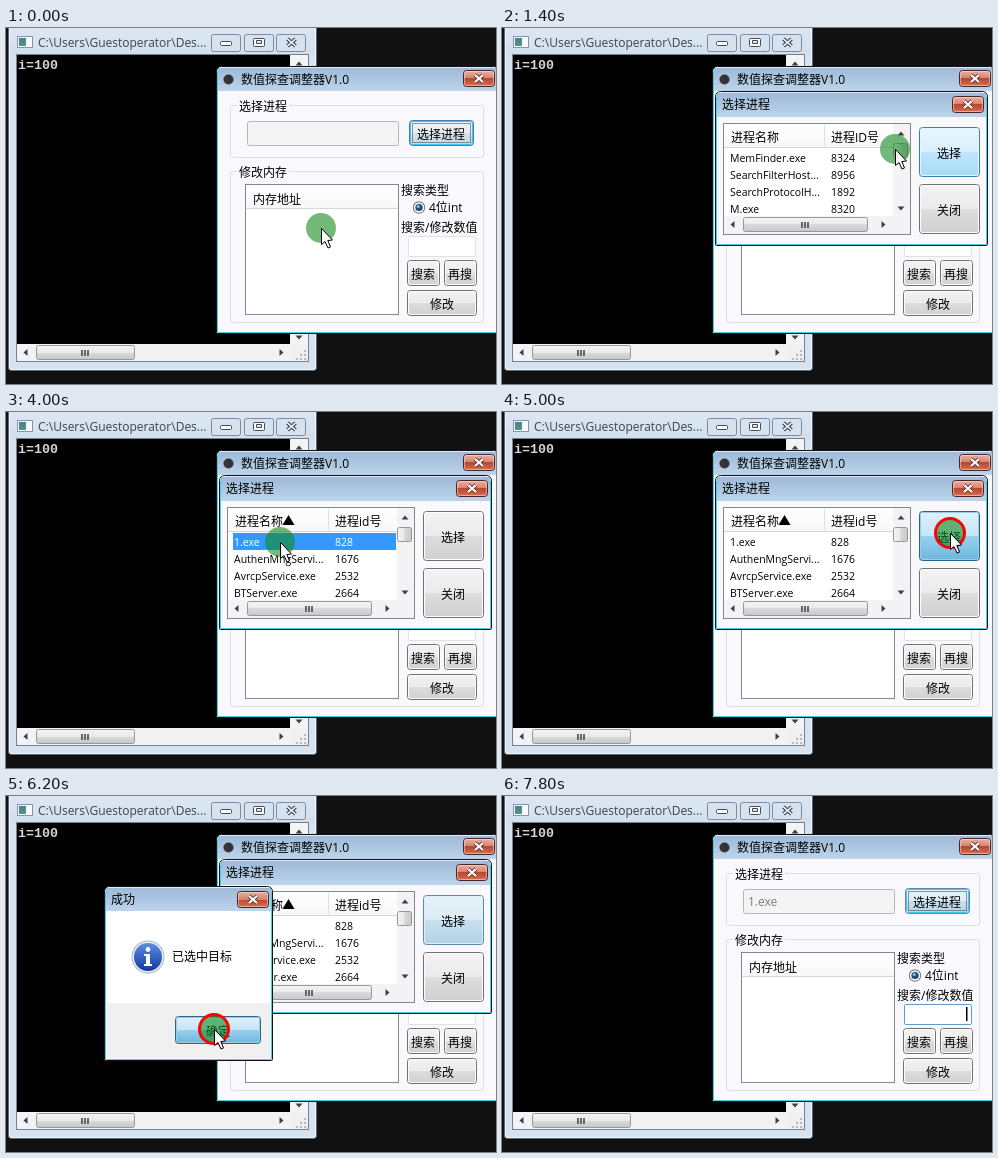
Recreate the animation shown at these times as an HTML page with a canvas. Size 490 by 356 pixels, loop 8000 ms.

```html
<!DOCTYPE html>
<html lang="zh">
<head>
<meta charset="utf-8">
<title>数值探查调整器</title>
<style>
html, body { margin: 0; width: 100%; height: 100%; overflow: hidden; background: #111; }
canvas { display: block; }
</style>
</head>
<body>
<canvas id="stage" width="490" height="356"></canvas>
<script>
const ctx = document.getElementById('stage').getContext('2d');
const UI = '12px "Open Sans", "Noto Sans CJK SC", "Noto Sans CJK", sans-serif';
const SMALL = '10.5px "Open Sans", "Noto Sans CJK SC", sans-serif';
const MONO = 'bold 13.33px "Liberation Mono", monospace';
const LOOP = 8000, CLIENT = '#f9f8fc', TRACK = '#f3f3f5';

// Pointer: time, x, y, pressed
const STEPS = [
  [0, 315, 200], [200, 250, 235], [400, 120, 285], [600, 34, 304], [800, 160, 260],
  [1000, 350, 150], [1200, 435, 106, 1],
  [1400, 393, 121], [1600, 345, 115], [1800, 318, 111], [2000, 308, 110], [2200, 305, 109],
  [2400, 304, 109], [2800, 304, 109, 1], [3200, 304, 109], [3400, 298, 112], [3600, 286, 120],
  [3800, 275, 129, 1], [4000, 274, 130], [4200, 300, 129], [4400, 360, 126], [4600, 410, 123],
  [4800, 444, 121], [5000, 448, 121, 1], [5200, 448, 121], [5400, 440, 127], [5600, 360, 165],
  [5800, 260, 212], [6000, 210, 232], [6200, 208, 233, 1],
  [6400, 208, 233], [6600, 270, 228], [6800, 390, 220], [7000, 452, 215], [7400, 454, 215, 1],
  [7600, 454, 215]
];
const POINTER_HIDDEN = 7800;

const BY_ID = [['MemFinder.exe', 8324], ['SearchFilterHost...', 8956], ['SearchProtocolH...', 1892], ['M.exe', 8320]];
const BY_NAME = [['1.exe', 828], ['AuthenMngServi...', 1676], ['AvrcpService.exe', 2532], ['BTServer.exe', 2664]];

const BUTTON = {
  normal: ['#707070', '#fcfcfc', '#f3f3f3', '#ebebeb', '#dddddd', '#cfcfcf'],
  focus: ['#3c7fb1', '#3ec8f0', '#f0f4f6', '#e6eef2', '#d6e3ea', '#c5d8e2'],
  tinted: ['#5d8aa8', '#d8f0fa', '#e8f2f8', '#dcebf4', '#c8e0ee', '#b2d2e4'],
  hot: ['#3c7fb1', '#e4f6fe', '#eaf6fd', '#d9f0fc', '#bee6fd', '#a7d9f5'],
  press: ['#2c628b', '#9ccbe4', '#e0f1fa', '#c4e5f6', '#98d1ef', '#6cb6dc']
};

function rect(x, y, w, h, fill) {
  ctx.fillStyle = fill;
  ctx.fillRect(x, y, w, h);
}
function box(x, y, w, h, border, fill) {
  rect(x, y, w, h, border);
  rect(x + 1, y + 1, w - 2, h - 2, fill);
}
function rounded(x, y, w, h, r, stroke, fill) {
  ctx.beginPath();
  ctx.roundRect(x + .5, y + .5, w - 1, h - 1, r);
  if (fill) { ctx.fillStyle = fill; ctx.fill(); }
  if (stroke) { ctx.lineWidth = 1; ctx.strokeStyle = stroke; ctx.stroke(); }
}
function text(s, x, y, color = '#000', font = UI) {
  ctx.font = font;
  ctx.fillStyle = color;
  ctx.fillText(s, x, y);
}
function line(points, color, width = 1) {
  ctx.beginPath();
  points.forEach(([x, y]) => ctx.lineTo(x, y));
  ctx.strokeStyle = color;
  ctx.lineWidth = width;
  ctx.stroke();
}
function disc(x, y, r, fill) {
  ctx.beginPath();
  ctx.arc(x, y, r, 0, 7);
  ctx.fillStyle = fill;
  ctx.fill();
}
// Two colours blend; four make a glossy fill with a hard middle edge.
function gradient(x0, y0, x1, y1, colors) {
  const g = ctx.createLinearGradient(x0, y0, x1, y1);
  const stops = colors.length === 4 ? [0, .5, .5, 1] : [0, 1];
  colors.forEach((c, i) => g.addColorStop(stops[i], c));
  return g;
}
const down = (y, h, ...colors) => gradient(0, y, 0, y + h, colors);

function button(label, x, y, w, h, state = 'normal') {
  const [edge, inner, ...fill] = BUTTON[state];
  rounded(x, y, w, h, 3, edge, down(y, h, ...fill));
  rounded(x + 1, y + 1, w - 2, h - 2, 2, inner);
  text(label, Math.floor(x + w / 2) - label.length * 6, y + h / 2 + 5.5);
}
function focusRing(x, y, w, h) {
  rounded(x + 1, y + 1, w - 2, h - 2, 2, '#3ec8f0');
  ctx.setLineDash([1, 1]);
  rounded(x + 3, y + 3, w - 6, h - 6, 0, '#333');
  ctx.setLineDash([]);
}
function cross(x, y, color, width) {
  line([[x - 4, y - 3.5], [x + 4, y + 3.5]], color, width);
  line([[x + 4, y - 3.5], [x - 4, y + 3.5]], color, width);
}
function closeButton(x, y) {
  rounded(x, y, 32, 17, 3, '#4b2525', down(y, 17, '#eab6a8', '#d4806f', '#bb4631', '#d67455'));
  rounded(x + 1, y + 1, 30, 15, 2, 'rgba(255,235,225,.5)');
  cross(x + 16, y + 8.5, '#6b3a34', 4);
  cross(x + 16, y + 8.5, '#fff', 2.2);
}
function frame(x, y, w, h, title, titleX, bar) {
  rounded(x, y, w, h, [5, 5, 1, 1], '#101418', CLIENT);
  rounded(x + 1, y + 1, w - 2, h - 2, [4, 4, 0, 0], '#45cfe8', CLIENT);
  rect(x + 2, y + 2, w - 4, bar - 2, down(y, bar, '#9bb8d6', '#bdd4ec'));
  rect(x + 4, y + 1, w - 8, 1, '#dfeaf5');
  text(title, titleX, y + bar / 2 + 5);
}
function arrow(x, y, dx, dy) {
  ctx.beginPath();
  ctx.moveTo(x + dx * 2.5, y + dy * 2.5);
  ctx.lineTo(x - dx * 1.5 + dy * 3.5, y - dy * 1.5 + dx * 3.5);
  ctx.lineTo(x - dx * 1.5 - dy * 3.5, y - dy * 1.5 - dx * 3.5);
  ctx.fillStyle = '#3c4048';
  ctx.fill();
}
function thumb(x, y, w, h, vertical) {
  const colors = ['#f5f5f5', '#e9e9eb', '#d9dadc', '#c5c6c9'];
  const fill = vertical ? gradient(x, 0, x + w, 0, colors) : down(y, h, ...colors);
  rounded(x, y, w, h, 2, '#979797', fill);
  if (!vertical) for (let i = -4; i <= 2; i += 3) {
    rect(x + (w >> 1) + i, y + 5, 2, 6, '#666');
  }
}
function group(label, x, y, w, h) {
  rounded(x, y, w, h, 3, '#d8dee6');
  rect(x + 7, y - 2, 52, 5, CLIENT);
  text(label, x + 9, y + 5.5);
}

function drawConsole() {
  rounded(2, -6, 309, 349, 3, '#5c6670', '#d5e2f0');
  rounded(3, -5, 307, 347, 2, '#edf4fb');
  rect(4, 0, 305, 26, down(0, 26, '#dce7f3', '#d2dfed'));
  box(11, 8, 16, 12, '#8797a6', '#f7fafc');
  rect(13, 10, 7, 8, down(10, 8, '#3f7fa6', '#4f9a7c'));
  text('C:\\Users\\Guestoperator\\Des...', 32, 19, '#404448');

  [205, 238, 270].forEach(x => rounded(x, 6, 30, 18, 2, '#7d8b9b', '#d6e2ef'));
  rounded(214, 13, 12, 5, 1, '#454c56', '#fff');
  rounded(247, 10, 12, 9, 1, '#454c56', '#fff');
  rounded(250, 12, 6, 4, 0, '#454c56', '#dae5f1');
  cross(285.5, 14.5, '#454c56', 3.8);
  cross(285.5, 14.5, '#fff', 1.6);

  box(10, 26, 293, 308, '#78828e', '#000');
  rect(284, 27, 18, 306, TRACK);
  rect(11, 316, 291, 17, TRACK);
  arrow(293, 36, 0, -1);
  arrow(293, 309, 0, 1);
  arrow(20, 324.5, -1, 0);
  arrow(275, 324.5, 1, 0);
  thumb(30, 317, 99, 15);
  rect(285, 316, 17, 17, '#f0f0f0');
  for (let i = 0; i < 3; i++) for (let j = 0; j <= i; j++) {
    rect(298 - j * 4, 322 + i * 4, 2, 2, '#b5bac0');
  }
  text('i=100', 12, 41, '#d4d4d4', MONO);
}

function drawMain(t) {
  const done = t >= 6400, typing = t >= 7400;
  frame(210, 38, 283, 268, '数值探查调整器V1.0', 235, 25);
  disc(222.5, 51.5, 5, '#333');
  closeButton(457, 42);

  group('选择进程', 224, 77, 254, 53);
  rounded(241, 93, 152, 25, 2, '#b4b6ba', '#f4f4f5');
  if (done) text('1.exe', 246, 109.5, '#7a7a7a');
  const pressed = t >= 1200 && t < 1400;
  button('选择进程', 403, 92, 65, 26, pressed ? 'press' : typing ? 'tinted' : 'focus');
  focusRing(403, 92, 65, 26);

  group('修改内存', 224, 143, 254, 152);
  box(239, 156, 154, 131, '#828790', '#fff');
  rect(240, 157, 152, 24, down(157, 24, '#fff', '#f6f7f9'));
  rect(240, 180, 152, 1, '#d5d7da');
  text('内存地址', 247, 175.5);
  text('搜索类型', 395, 166.5);
  disc(413, 179.5, 6.2, '#6d747c');
  disc(413, 179.5, 5.2, '#f2f5f7');
  disc(413, 179.5, 3.6, '#1d4f6c');
  disc(412.3, 178.6, 1.7, '#6cc0e0');
  text('4位int', 423, 184);
  text('搜索/修改数值', 395, 203.5);
  rounded(402, 208, 68, 21, 1, typing ? '#5e9fc9' : '#e0e2e7', '#fff');
  if (t >= 7600) rect(464, 211, 1.5, 14, '#000');
  button('搜索', 401, 232, 33, 26);
  button('再搜', 438, 232, 33, 26);
  button('修改', 401, 262, 70, 26);
}

function drawPicker(t, x, y) {
  const sorted = t >= 3000, selected = t >= 4000 && t < 5000;
  const headerHot = x > 222 && x < 322 && y > 96 && y < 120 && t < 5000;
  frame(213, 63, 273, 155, '选择进程', 220, 26);
  closeButton(450, 68);

  box(221, 95, 188, 112, '#828790', '#fff');
  rect(222, 96, 169, 23, down(96, 23, '#fff', '#f6f7f9'));
  rect(222, 119, 169, 1, '#d5d7da');
  if (headerHot) {
    rect(222, 96, 101, 23, down(96, 23, '#e7f7ff', '#dcf4ff', '#c1eafd', '#b4e4fb'));
    rect(222, 119, 101, 1, '#93c9e3');
  }
  rect(322, 97, 1, 22, headerHot ? '#88cbeb' : '#dde0e4');
  text('进程名称', 229, 113.5);
  if (sorted) {
    ctx.beginPath();
    ctx.moveTo(282.5, 103); ctx.lineTo(288.5, 113); ctx.lineTo(276.5, 113);
    ctx.fillStyle = '#000';
    ctx.fill();
  }
  text(sorted ? '进程id号' : '进程ID号', 329, 113.5);
  if (selected) rect(227, 121, 163, 17, '#3399ff');
  (sorted ? BY_NAME : BY_ID).forEach(([name, id], i) => {
    const color = selected && i === 0 ? '#fff' : '#000';
    text(name, 228, 134 + i * 17, color, SMALL);
    text(id, 329, 134 + i * 17, color, SMALL);
  });

  rect(391, 96, 17, 110, TRACK);
  rect(222, 188, 186, 18, TRACK);
  arrow(399, 106, 0, -1);
  arrow(399, 180, 0, 1);
  arrow(231, 196.5, -1, 0);
  arrow(381, 196.5, 1, 0);
  thumb(391, 115, 15, 15, true);
  thumb(241, 189, 125, 15);

  let state = 'normal';
  if (t >= 5400) state = 'tinted';
  else if (t >= 5000) state = 'press';
  else if (t < 1600 || x > 417) state = 'hot';
  button('选择', 417, 99, 61, 50, state);
  button('关闭', 417, 156, 61, 50);
}

function drawMessage(t) {
  frame(98, 90, 169, 175, '成功', 105, 25);
  closeButton(231, 95);
  rect(101, 115, 163, 92, '#fff');
  rect(101, 207, 163, 55, '#f1f0f1');
  disc(142, 161, 16.5, '#a9b4c4');
  disc(142, 161, 15.5, '#e8eef6');
  disc(142, 161, 14, down(147, 28, '#5c8fe0', '#1238a0'));
  disc(142, 153.5, 2.4, '#fff');
  rect(140, 158, 4, 11, '#fff');
  rect(138, 158, 4, 2, '#fff');
  rect(138, 168, 8, 2, '#fff');
  text('已选中目标', 166, 164.5);
  button('确定', 169, 220, 86, 28, t >= 6200 ? 'press' : t >= 6000 ? 'hot' : 'focus');
}

function drawPointer(x, y, pressed, beam) {
  disc(x, y, 15, 'rgba(20,138,33,.6)');
  if (pressed) {
    ctx.beginPath();
    ctx.arc(x, y, 14.5, 0, 7);
    ctx.strokeStyle = '#f00';
    ctx.lineWidth = 3;
    ctx.stroke();
  }
  if (beam) {
    rect(x, y - 7, 1, 15, '#000');
    rect(x - 3, y - 8, 7, 1, '#000');
    rect(x - 3, y + 8, 7, 1, '#000');
    return;
  }
  const shape = [[0, 0], [0, 16], [3.5, 13], [6.5, 19.5], [9, 18.5], [6.3, 12], [11, 11.5]];
  ctx.beginPath();
  shape.forEach(([dx, dy]) => ctx.lineTo(x + .5 + dx, y + .5 + dy));
  ctx.closePath();
  ctx.fillStyle = '#fff';
  ctx.fill();
  ctx.strokeStyle = '#000';
  ctx.lineWidth = 1;
  ctx.stroke();
}

function draw(now) {
  const t = now % LOOP;
  const [, x, y, pressed] = STEPS.findLast(step => step[0] <= t);
  rect(0, 0, 490, 356, '#111');
  drawConsole();
  drawMain(t);
  if (t >= 1400 && t < 6400) drawPicker(t, x, y);
  if (t >= 5400 && t < 6400) drawMessage(t);
  if (t < POINTER_HIDDEN) drawPointer(x, y, pressed, t >= 7000);
  requestAnimationFrame(draw);
}
requestAnimationFrame(draw);
</script>
</body>
</html>
```
